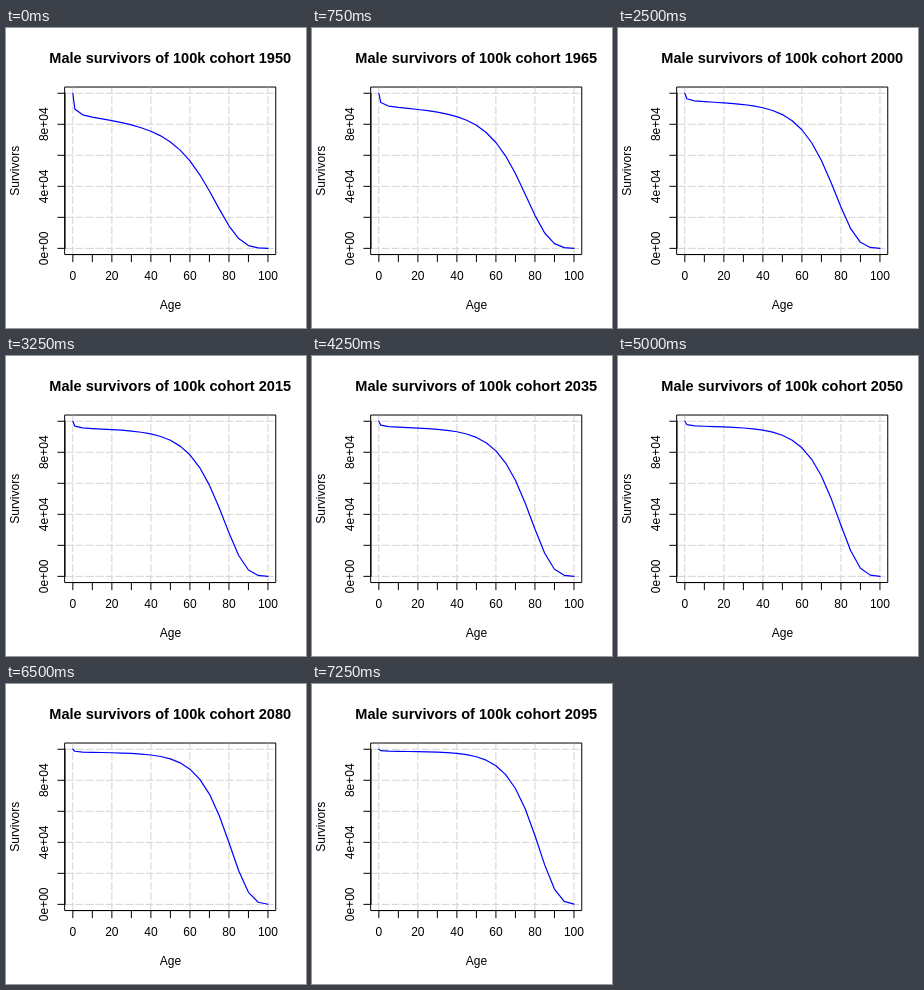
These frames come from a looping animation (300 px wide and 300 px high, 7.5 s). An HTML page:

```html
<!DOCTYPE html>
<html lang="en">
<head>
<meta charset="utf-8">
<title>Cohort survivors</title>
<style>
  html, body { margin: 0; width: 100%; height: 100%; overflow: hidden; background: #fff; }
  svg { display: block; }
  text { font: 12px "Liberation Sans", Arial, sans-serif; text-anchor: middle; }
  #title { font-size: 14.55px; font-weight: bold; }
  path { fill: none; stroke: #000; stroke-linecap: round; stroke-linejoin: round; }
  #grid { stroke: #d3d3d3; stroke-dasharray: 7 3; }
  #curve { stroke: #00f; stroke-width: 1.2; }
</style>
</head>
<body>
<svg width="300" height="300" viewBox="0 0 300 300">
  <path id="axes"/>
  <path id="grid"/>
  <path id="curve"/>
  <g id="labels"></g>
  <text id="title" x="164.2" y="35"></text>
  <text x="164.4" y="281">Age</text>
  <text transform="translate(13 142.8) rotate(-90)">Survivors</text>
</svg>
<script>
const STEP_MS = 250, STEPS = 30, FIRST_YEAR = 1950, YEARS_PER_STEP = 5;
const LEFT = 59.04, TOP = 59.04, RIGHT = 269.76, BOTTOM = 226.56, TICK = 7.2;
const ages = [0, 1, ...Array.from({ length: 20 }, (_, i) => 5 * (i + 1))];

const el = id => document.getElementById(id);
const xAt = age => 66.84 + age * 1.9512;
const yAt = percent => 220.36 - percent * 1.5511;

function drawFrame() {
  let axes = `M${LEFT} ${TOP}H${RIGHT}V${BOTTOM}H${LEFT}Z`, grid = "", labels = "";
  axes += `M${xAt(0)} ${BOTTOM}H${xAt(100)}M${LEFT} ${yAt(0)}V${yAt(100)}`;
  for (let v = 0; v <= 100; v += 10) {
    const x = xAt(v), y = yAt(v);
    axes += `M${x} ${BOTTOM}v${TICK}`;
    if (v % 20) continue;
    axes += `M${LEFT} ${y}h${-TICK}`;
    grid += `M${x} ${BOTTOM - 1}V${TOP + 1}M${LEFT + 1} ${y}H${RIGHT - 1}`;
    labels += `<text x="${x}" y="252">${v}</text>`;
    if (v % 40 === 0)
      labels += `<text transform="translate(42 ${y}) rotate(-90)">${v / 10}e+0${v ? 4 : 0}</text>`;
  }
  el("axes").setAttribute("d", axes);
  el("grid").setAttribute("d", grid);
  el("labels").innerHTML = labels;
}

// Percent alive: childhood, constant and exponentially ageing hazards.
// u runs from 0 to 1 over the loop; early terms fade in the first decades.
function survival(age, u) {
  const early = Math.exp(-12 * u);
  const child = .0698 - .0573 * u + .08 * early;
  const background = .0006 - .0005 * u + .0012 * early;
  const ageing = .0866 + .02 * u - .0046 * early;
  const modalAge = 78 - 2.64 * u + 6.84 * u * u - 4 * Math.exp(-9 * u);
  const hazard = child * (1 - Math.exp(-1.2 * Math.sqrt(age)))
    + background * age
    + Math.exp(ageing * (age - modalAge)) - Math.exp(-ageing * modalAge);
  return 100 * Math.exp(-hazard);
}

function tick(now) {
  const step = Math.floor(now / STEP_MS) % STEPS;
  const u = step / (STEPS - 1);
  const points = ages.map(age => `${xAt(age).toFixed(2)} ${yAt(survival(age, u)).toFixed(2)}`);
  el("curve").setAttribute("d", "M" + points.join("L"));
  el("title").textContent = `Male survivors of 100k cohort ${FIRST_YEAR + YEARS_PER_STEP * step}`;
  requestAnimationFrame(tick);
}

drawFrame();
tick(performance.now());
</script>
</body>
</html>
```
